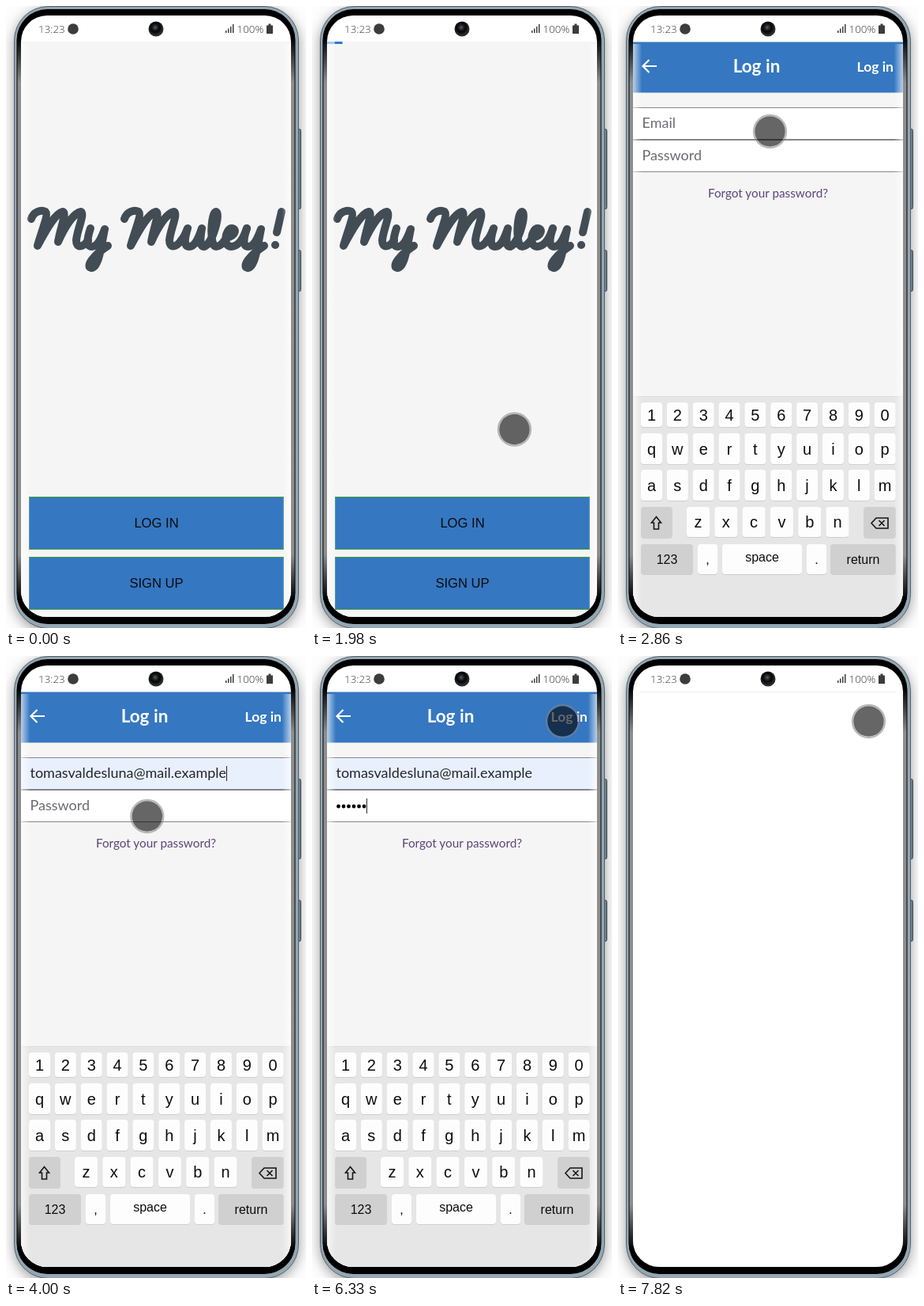
An HTML page that plays this animation: 380 by 786 pixels, repeating every 8000 ms.

```html
<!DOCTYPE html>
<html lang="en">
<head>
<meta charset="utf-8">
<title>Phone log in</title>
<style>
  html, body { margin: 0; width: 100%; height: 100%; overflow: hidden; background: #fff; }
  svg { display: block; width: 100%; height: 100%; }
  .ui { font-family: Lato, "Open Sans", sans-serif; }
  .key { font-family: "Liberation Sans", Arial, sans-serif; text-anchor: middle; fill: #0c0c0c; }
  .status { font: 300 13.400px "Open Sans", sans-serif; fill: #3c3c3c; }
  .logo { fill: none; stroke: #424c55; stroke-width: 10; stroke-linecap: round; stroke-linejoin: round; }
  .field { fill: #fff; stroke: #85858a; }
  .hint { font-size: 18px; fill: #6c6a73; }
</style>
</head>
<body>
<svg viewBox="0 0 380 786" preserveAspectRatio="none">
  <defs>
    <clipPath id="screen"><rect x="19" y="12" width="342" height="760" rx="33"/></clipPath>
    <linearGradient id="side" x2="0" y2="1">
      <stop offset="0" stop-color="#000"/><stop offset=".08" stop-color="#8e8e8e"/>
      <stop offset=".92" stop-color="#8e8e8e"/><stop offset="1" stop-color="#000"/>
    </linearGradient>
    <linearGradient id="glow">
      <stop offset="0" stop-color="#fff" stop-opacity=".65"/>
      <stop offset=".033" stop-color="#fff" stop-opacity="0"/>
      <stop offset=".967" stop-color="#fff" stop-opacity="0"/>
      <stop offset="1" stop-color="#fff" stop-opacity=".65"/>
    </linearGradient>
    <radialGradient id="lens" cx=".45" cy=".4">
      <stop offset="0" stop-color="#5b6068"/><stop offset=".3" stop-color="#22252a"/>
      <stop offset=".6" stop-color="#050505"/><stop offset="1" stop-color="#2b2b2b"/>
    </radialGradient>
    <filter id="shade" x="-10%" y="-10%" width="120%" height="120%">
      <feDropShadow dx="0" dy="4" stdDeviation="8" flood-opacity=".38"/>
    </filter>
    <path id="M" d="M32 269C35 260 44 257 50 260C54 264 45 285 40 303C50 284 62 262 72 260C77 262 69 280 66 298C74 280 85 262 95 260C100 263 90 283 89 296C89 306 97 306 104 296"/>
    <path id="y" d="M107 281C103 293 101 304 109 304C116 304 121 293 125 282C121 300 118 331 108 331C100 329 112 314 129 303"/>
  </defs>

  <!-- phone body -->
  <rect width="380" height="786" fill="#fdfdfd"/>
  <g fill="#8799a4" stroke="#4c5a64">
    <rect x="369" y="155.500" width="4.500" height="101" rx="2"/>
    <rect x="369" y="308.500" width="4.500" height="52" rx="2"/>
  </g>
  <rect x="10.500" y=".5" width="360" height="786" rx="43" fill="#94a7b2" stroke="#52616b" filter="url(#shade)"/>
  <rect x="13.500" y="4" width="353" height="777" rx="39"/>
  <rect x="14.500" y="40" width="4.500" height="710" fill="url(#side)"/>
  <rect x="361" y="40" width="4.500" height="710" fill="url(#side)"/>

  <g clip-path="url(#screen)">
    <rect x="19" y="12" width="342" height="760" fill="#fff"/>
    <path d="M28 45.500H352" stroke="#ececec"/>
    <rect id="paper" x="19" y="45" width="342" height="727" fill="#f5f5f5"/>

    <g id="home">
      <g class="logo" role="img" aria-label="My Muley!">
        <use href="#M"/><use href="#y"/><use href="#M" x="118"/>
        <path d="M222 296C226 292 228 286 230 281C226 294 225 304 232 304C239 304 244 293 248 281C246 293 245 304 251 304C262 300 272 262 266 260C260 260 257 304 266 304C272 304 276 298 279 293C292 290 292 281 286 281C278 281 274 304 285 304C296 304 302 290 305 281"/>
        <use href="#y" x="198"/>
        <path d="M349 260L343 286M341 302h.1"/>
      </g>
      <g id="buttons"></g>
      <rect id="tail" x="19" y="45" height="3" fill="#a3c8f3"/>
      <rect id="bar" y="45" height="3" fill="#2e7ad3"/>
    </g>

    <g id="login" class="ui">
      <rect x="19" y="45.500" width="342" height="64" fill="#3577c1"/>
      <path d="M49 76H32M39.500 68L31.500 76L39.500 84" fill="none" stroke="#fff" stroke-width="2.200"/>
      <text x="175.500" y="84" text-anchor="middle" font-size="22.500" font-weight="700" fill="#fff">Log in</text>
      <text x="349" y="83" text-anchor="end" font-size="17.500" font-weight="700" fill="#fff">Log in</text>
      <rect id="mailBox" class="field" x="18.500" y="128.500" width="343" height="40"/>
      <rect class="field" x="18.500" y="169.500" width="343" height="40"/>
      <text id="mailHint" class="hint" x="30.500" y="154">Email</text>
      <text id="mail" x="30.500" y="154" font-size="18" fill="#25252c">tomasvaldesluna@mail.example</text>
      <text id="passHint" class="hint" x="30.500" y="195">Password</text>
      <g id="dots"></g>
      <rect id="caret" width="1" height="19" fill="#222"/>
      <text x="190" y="242" text-anchor="middle" font-size="15.300" fill="#5c4678">Forgot your password?</text>
      <g id="keys"></g>
    </g>

    <rect x="19" y="48" width="342" height="724" fill="url(#glow)"/>
  </g>

  <!-- status bar -->
  <g class="status">
    <text x="41" y="34">13:23</text>
    <text x="292.500" y="34">100%</text>
    <circle cx="85" cy="29" r="6.800"/>
    <path d="M278 31h1.500v3h-1.500zM281 28.500h1.500v5.500h-1.500zM284 26h1.500v8h-1.500zM287 23h1.500v11h-1.500zM330 24.500h2.500v-2h3v2h2.500v10.500h-8z"/>
  </g>
  <circle cx="190" cy="29" r="9.500" fill="url(#lens)"/>

  <g id="cursor">
    <circle r="19.300" fill="#000" fill-opacity=".6"/>
    <circle r="20.500" fill="none" stroke="#828282" stroke-opacity=".55" stroke-width="2.400"/>
  </g>
</svg>
<script>
const $ = id => document.getElementById(id);
const show = (id, on) => $(id).setAttribute('visibility', on ? 'inherit' : 'hidden');
const set = (id, attrs) => { for (const k in attrs) $(id).setAttribute(k, attrs[k]); };
const clamp = x => Math.min(1, Math.max(0, x));
const ease = x => x * x * (3 - 2 * x);

// static parts
$('buttons').innerHTML = [['LOG IN', 620], ['SIGN UP', 696]].map(([label, y]) =>
  `<rect x="29" y="${y}" width="323" height="67" fill="#3577c1"/>
   <path d="M29 ${y + .5}h323M29 ${y + 66.5}h323" stroke="#48a238"/>
   <path d="M29.500 ${y + 1}v65M351.500 ${y + 1}v65" stroke="#4e91b0"/>
   <text class="key" x="190.500" y="${y + 39}" font-size="16.600">${label}</text>`).join('');

function key(label, x, y, w, h, size = 20, fill = '#fdfdfd', lift = 0) {
  return `<rect x="${x}" y="${y + 1}" width="${w}" height="${h}" rx="4" fill="#cfcfcf"/>
    <rect x="${x}" y="${y}" width="${w}" height="${h}" rx="4" fill="${fill}"/>
    <text class="key" x="${x + w / 2}" y="${y + h / 2 + size * .36 - lift}" font-size="${size}">${label}</text>`;
}
const row = (chars, x, step, y, w, h) =>
  [...chars].map((c, i) => key(c, x + i * step, y, w, h)).join('');
const gray = '#d0d0d0', white = '#fdfdfd';
$('keys').innerHTML = `<rect x="19" y="493" width="342" height="290" fill="#e6e6e6"/>
  <path d="M19 493.500h342" stroke="#dcdcdc"/>` +
  row('1234567890', 29, 32.85, 501, 27, 31) +
  row('qwertyuiop', 29, 32.85, 540, 27, 39) +
  row('asdfghjklm', 29, 32.85, 586, 27, 39) +
  key('', 29, 633, 40, 39, 20, gray) +
  row('zxcvbn', 87, 35.3, 633, 29, 38) +
  key('', 311, 633, 41, 39, 20, gray) +
  key('123', 29, 680, 66, 38, 16, gray) + key(',', 101, 680, 25, 38, 16) +
  key('space', 132, 680, 101, 38, 16, white, 3) + key('.', 239, 680, 25, 38, 16) +
  key('return', 269, 680, 83, 38, 16, gray) +
  `<path d="M48.500 645.500l6 7.500h-3v8h-6v-8h-3zM321 653.500l6-6.500h15v13h-15zM330.500 650l7 7m0-7l-7 7"
    fill="none" stroke="#151515" stroke-width="1.600"/>`;
$('dots').innerHTML = Array.from({ length: 6 }, (_, i) =>
  `<circle cx="${33.5 + i * 6.5}" cy="190" r="2.400"/>`).join('');

// pointer stops: time, x, y
const stops = [
  [320, 372, 778], [650, 231, 659], [1710, 231, 659], [1980, 256.5, 535.5],
  [2510, 227, 278], [2790, 198, 189], [2860, 192.5, 158.5], [3060, 192.5, 158.5],
  [3340, 178.8, 202.5], [5860, 178.8, 202.5], [6330, 317.5, 82.5], [8000, 317.5, 82.5]
];
const typed = [5070, 5130, 5390, 5530, 5800, 5860];

function pointer(t) {
  const i = Math.max(1, stops.findIndex(s => s[0] >= t));
  const [a, x, y] = stops[i - 1], [b, u, v] = stops[i];
  let p = clamp((t - a) / (b - a));
  if (b === 650) p = 1 - (1 - p) ** 2;
  if (b === 3340 || b === 6330) p = ease(p);
  return `translate(${x + (u - x) * p} ${y + (v - y) * p})`;
}

function draw(t) {
  const home = t < 2240, blank = t >= 7820;
  show('paper', !blank);
  show('home', home);
  show('login', !home && !blank);

  const load = t < 1910 ? 0 : Math.max(8, 19 + (t - 1980) * .6);
  set('tail', { width: load / 2 });
  set('bar', { x: 19 + load / 2, width: load / 2 });

  const up = ease(clamp((t - 2300) / 180)) - ease(clamp((t - 6470) / 320));
  set('keys', { transform: `translate(0 ${280 * (1 - up)})` });

  const filled = t >= 3480, inPass = t >= 4270;
  const count = typed.filter(k => t >= k).length;
  show('mail', filled);
  show('mailHint', !filled);
  $('mailBox').style.fill = filled ? '#e8f0fe' : '#fff';
  show('passHint', !count);
  [...$('dots').children].forEach((d, i) => d.setAttribute('visibility', i < count ? 'inherit' : 'hidden'));

  show('caret', !blank && filled && t < 6470 && !(t >= 4800 && t < 5070));
  set('caret', inPass
    ? { x: 30.5 + count * 6.4, y: 180 }
    : { x: 30.5 + $('mail').getComputedTextLength(), y: 139 });

  // nested parts must follow a hidden page
  show('cursor', t >= 320);
  set('cursor', { transform: pointer(t) });
}

const start = performance.now();
function loop() {
  draw((performance.now() - start) % 8000);
  requestAnimationFrame(loop);
}
loop();
</script>
</body>
</html>
```
